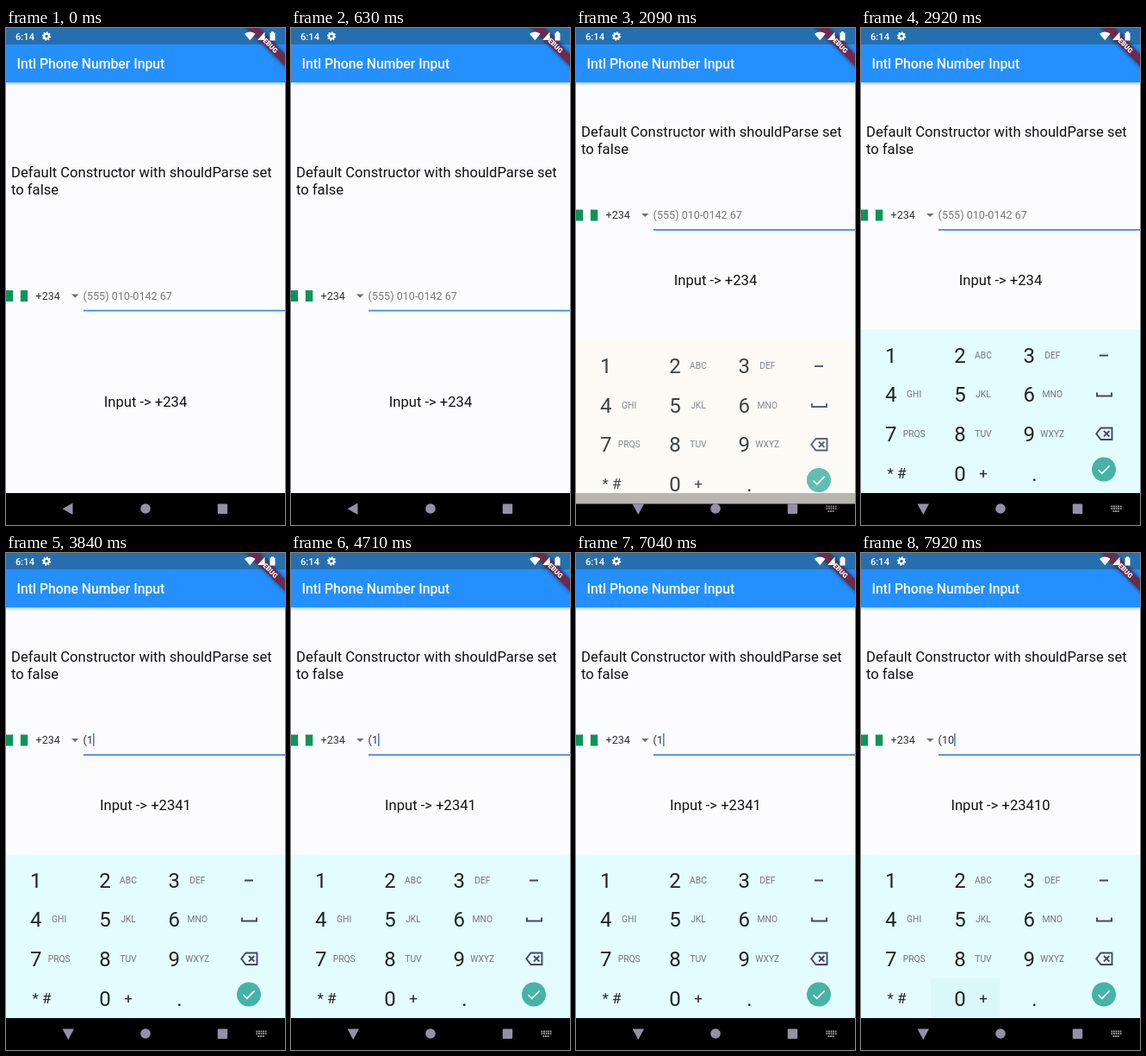
An HTML page for the animation above (8 s loop, 324 by 576 pixels).

```html
<!DOCTYPE html>
<html lang="en">
<head>
<meta charset="utf-8">
<title>Phone input</title>
<style>
  html, body { margin: 0; height: 100%; overflow: hidden; background: #000; }
  svg { display: block; width: 100vw; height: 100vh; font-family: Roboto, sans-serif; }
  .big { font-size: 16.6px; fill: #111; }
  .small { font-size: 12.6px; }
  .digit { font-size: 24px; fill: #1d2424; text-anchor: middle; }
  .letters { font-size: 10.3px; fill: #70767c; text-anchor: middle; }
  .symbol { font-size: 17px; fill: #222829; text-anchor: middle; }
  .line { fill: none; stroke: #41466c; stroke-width: 1.9; }
  .band { filter: drop-shadow(0 0 2.5px #0009); }
</style>
</head>
<body>
<svg viewBox="0 0 324 576" preserveAspectRatio="none">
  <defs>
    <linearGradient id="shade" x2="0" y2="1">
      <stop stop-color="#c4cddd"/><stop offset="1" stop-color="#fcfcfe"/>
    </linearGradient>
  </defs>

  <rect width="324" height="539" fill="#fcfcfe"/>
  <rect y="63" width="324" height="4" fill="url(#shade)"/>
  <rect y="19" width="324" height="44" fill="#2490ff"/>
  <rect width="324" height="19" fill="#266fae"/>
  <text x="12.5" y="47" font-size="15.76" font-weight="500" fill="#fff">Intl Phone Number Input</text>

  <g id="heading" class="big">
    <text x="6" y="172.5">Default Constructor with shouldParse set</text>
    <text x="6" y="192.5">to false</text>
  </g>

  <g id="field" class="small">
    <path d="M0 304h8.3v13H0zM16.6 304h8.6v13h-8.6z" fill="#0a9558"/>
    <rect x="8.3" y="304" width="8.3" height="13" fill="#fff"/>
    <text x="34.5" y="315" fill="#333">+234</text>
    <path d="M76 308.5h8.5l-4.25 4.2z" fill="#707070"/>
    <text id="hint" x="89.6" y="315" fill="#77777c">(555) 010-0142 67</text>
    <text id="typed" x="89.6" y="315" fill="#333"></text>
    <rect id="cursor" y="302.5" width="1.6" height="15" fill="#4a80e0"/>
    <rect id="underline" x="90" y="326.7" width="234" height="1.7"/>
  </g>

  <text id="result" class="big" x="162" y="439" text-anchor="middle"></text>

  <rect y="539" width="324" height="37" fill="#000"/>

  <g id="keyboard">
    <rect id="panel" y="349.5" width="324" height="189.5"/>
    <rect id="pressed" width="80" height="45" fill="#daf8fa"/>
    <g id="keys">
      <g id="digits"></g>
      <path class="line" d="M277 379.5h10M274 422.5v4h17v-4"/>
      <path class="line" d="M278.5 463.5h13v13.5h-13l-5.2-6.75zM282 467l6.4 6.4M288.4 467l-6.4 6.4"/>
      <text class="symbol" x="41.5" y="522">* #</text>
      <text class="symbol" x="142" y="522">+</text>
      <text class="digit" x="201.5" y="524.5">.</text>
      <circle cx="282" cy="511.5" r="14" fill="#45b3a6"/>
      <path d="M275.5 512l4.3 4.3 8.8-9" fill="none" stroke="#fff" stroke-width="1.7"/>
    </g>
  </g>

  <g fill="#9590a8">
    <path id="back"/>
    <circle cx="162" cy="557" r="5.8"/>
    <rect x="245.8" y="551.5" width="11.4" height="11.5" rx="1"/>
    <path id="switcher" fill="none" stroke="#a3a3a8" stroke-width="1.8" stroke-dasharray="1.8 .8"
          d="M290.5 554.5h12M290.5 557.2h12M292.5 560h8"/>
  </g>

  <g transform="translate(324 0) rotate(45)">
    <rect class="band" x="-40" y="21.6" width="80" height="9.5" fill="#6c2a4c"/>
    <text y="29.1" font-size="8" font-weight="900" fill="#fff" text-anchor="middle">DEBUG</text>
  </g>

  <g fill="#fff">
    <text x="11" y="13.5" font-size="11.2" font-weight="500">6:14</text>
    <circle cx="47" cy="9.5" r="2.9" fill="none" stroke="#fff" stroke-width="2.2"/>
    <circle cx="47" cy="9.5" r="4.4" fill="none" stroke="#fff" stroke-width="1.6"
            pathLength="16" stroke-dasharray="1 1"/>
    <path d="M277 6.8q6.3-4.4 12.6 0l-6.3 7.4z"/>
    <path d="M292 14l8.5-9.5V14z"/>
    <path d="M306.5 5.5h1.5V4.2h3v1.3h1.5V14.5h-6z"/>
  </g>
</svg>

<script>
const LOOP = 8000;
const SLIDE_START = 2000, SLIDE_TIME = 190, CURSOR_START = 2250;
const PRESSES = [
  { char: '1', x: 1, y: 357, down: 3500, typed: 3600, up: 3700 },
  { char: '0', x: 81, y: 493, down: 7740, typed: 7840, up: LOOP }
];
const FONT_SIZE = 12.6;

const el = id => document.getElementById(id);
const show = (id, opacity) => el(id).setAttribute('opacity', +opacity);
const moveY = (id, y) => el(id).setAttribute('transform', `translate(0 ${y})`);

const labels = ['', 'ABC', 'DEF', 'GHI', 'JKL', 'MNO', 'PRQS', 'TUV', 'WXYZ'];
const digit = (char, x, y) => `<text class="digit" x="${x}" y="${y}">${char}</text>`;
el('digits').innerHTML = labels.map((label, i) => {
  const x = 34.7 + (i % 3) * 80.3, y = 387.7 + Math.floor(i / 3) * 45.6;
  return digit(i + 1, x, y) +
    `<text class="letters" x="${x + 27}" y="${y - 5}">${label}</text>`;
}).join('') + digit(0, 115, 524.5);

function render(t) {
  const open = t >= SLIDE_START;
  moveY('heading', open ? -47 : 0);
  moveY('field', open ? -93.6 : 0);
  moveY('result', open ? -140.6 : 0);
  el('underline').setAttribute('fill', open ? '#4580e6' : '#2f8df0');
  el('back').setAttribute('d', open ? 'M65.5 551.5h13.5l-6.75 12.5z' : 'M77.5 550.5v13.5l-12-6.75z');

  // The keyboard decelerates upward while fading in, pale until it settles.
  const progress = Math.min(1, Math.max(0, (t - SLIDE_START) / SLIDE_TIME));
  const eased = 1 - (1 - progress) ** 2;
  moveY('keyboard', 46 * (1 - eased));
  show('panel', eased);
  show('keys', Math.sqrt(eased));
  show('switcher', Math.sqrt(eased));
  el('panel').setAttribute('fill', progress < 1 ? '#fbfaf2' : '#e3fcff');

  const done = PRESSES.filter(p => t >= p.typed);
  const digits = done.map(p => p.char).join('');
  el('typed').textContent = digits && '(' + digits;
  el('result').textContent = 'Input -> +234' + digits;
  show('hint', !digits);

  const blinkStart = done.length ? done.at(-1).typed : CURSOR_START;
  show('cursor', t >= blinkStart && (t - blinkStart) % 1000 < 500);
  const textWidth = digits ? 0.342 + 0.562 * digits.length : 0;
  el('cursor').setAttribute('x', 89.6 + FONT_SIZE * textWidth);

  const press = PRESSES.find(p => t >= p.down && t < p.up);
  show('pressed', !!press);
  if (press) {
    el('pressed').setAttribute('x', press.x);
    el('pressed').setAttribute('y', press.y);
  }
}

const start = performance.now();
function tick() {
  render((performance.now() - start) % LOOP);
  requestAnimationFrame(tick);
}
tick();
</script>
</body>
</html>
```
